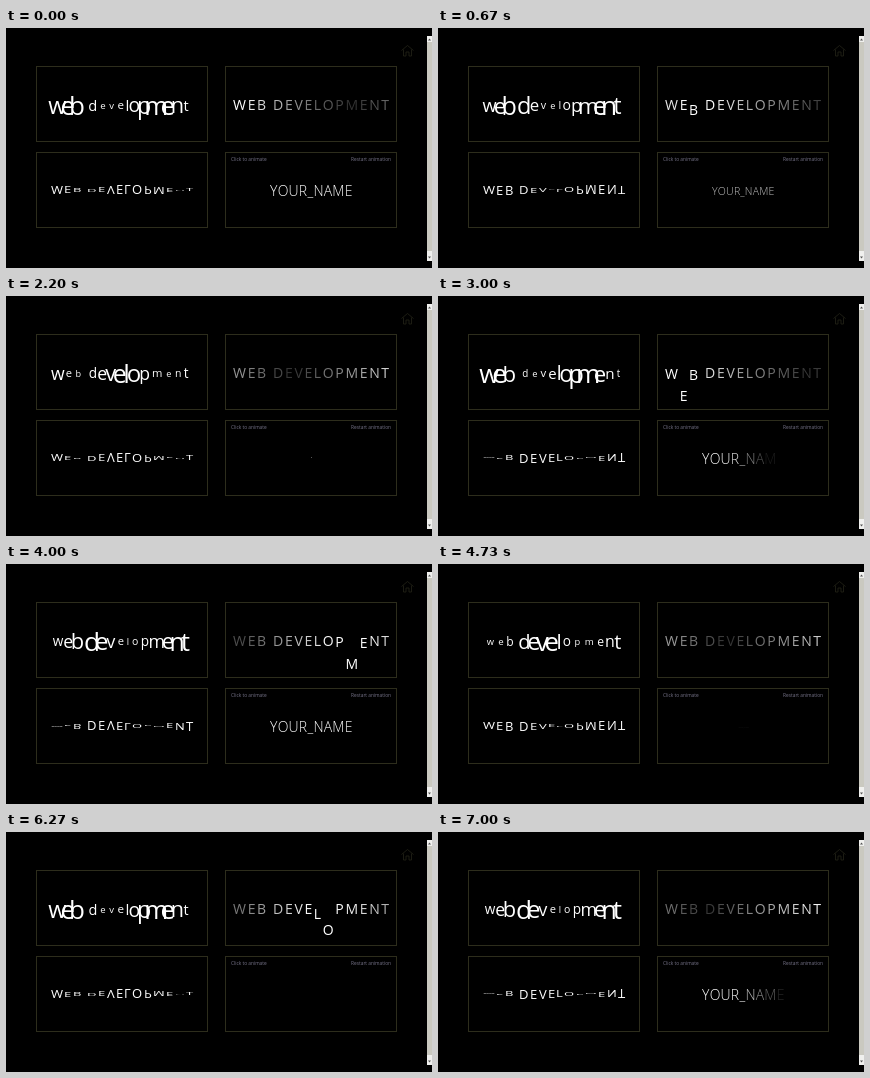
An HTML page for the animation above (7.07 s loop, 426x240 px).

```html
<!DOCTYPE html>
<html lang="en">
<head>
<meta charset="utf-8">
<title>Text animations</title>
<style>
  html, body { margin: 0; width: 100%; height: 100%; overflow: hidden; background: #000; }
  #stage { position: relative; width: 426px; height: 240px; overflow: hidden; background: #000;
    color: #fff; font-family: "Open Sans", "Noto Sans", sans-serif; }
  svg { position: absolute; left: 0; top: 0; }
  .line { position: absolute; height: 40px; line-height: 40px; white-space: pre; }
  .line span { display: inline-block; white-space: pre; }
  .label { position: absolute; top: 126px; line-height: 10px; font-size: 4.8px; color: #77748a; white-space: pre; }
</style>
</head>
<body>
<div id="stage">
  <svg width="426" height="240" viewBox="0 0 426 240">
    <g fill="none" stroke="#2d2d1c">
      <rect x="30.5" y="38.5" width="171" height="75"/>
      <rect x="219.5" y="38.5" width="171" height="75"/>
      <rect x="30.5" y="124.5" width="171" height="75"/>
      <rect x="219.5" y="124.5" width="171" height="75"/>
    </g>
    <path d="M395.5 22.500l6-5 6 5M397.500 21.500v6.500h2.500v-4h3v4h2.500v-6.500" fill="none" stroke="#242418" stroke-width=".8"/>
    <rect x="421" y="8" width="5" height="225" fill="#f0f0ee"/>
    <rect x="421" y="14" width="5" height="209" fill="#cac9c0"/>
    <path d="M422 12.500l1.500-2 1.500 2zM422 228.500l1.500 2 1.500-2z" fill="#555"/>
  </svg>
  <div class="label" style="left:225px">Click to animate</div>
  <div class="label" style="right:41px">Restart animation</div>
</div>
<script>
  const LOOP = 7070, LEAD_IN = 280;
  const TAU = 2 * Math.PI;
  const stage = document.getElementById("stage");
  const clamp = x => Math.min(1, Math.max(0, x));
  const mod = (a, n) => ((a % n) + n) % n;
  const smooth = x => (1 - Math.cos(Math.PI * x)) / 2;

  // CSS "ease": cubic-bezier(.25, .1, .25, 1)
  function ease(x) {
    const bezier = (u, a, b) => 3 * u * (1 - u) * (1 - u) * a + 3 * u * u * (1 - u) * b + u * u * u;
    let low = 0, high = 1;
    for (let k = 0; k < 16; k++) {
      const mid = (low + high) / 2;
      if (bezier(mid, .25, .25) < x) low = mid; else high = mid;
    }
    return bezier(low, .1, 1);
  }

  function makeLine(text, x, centerY, size, spacing, weight = 400) {
    const line = document.createElement("div");
    line.className = "line";
    Object.assign(line.style, {
      left: x + "px", top: centerY - 20 + "px", fontSize: size + "px",
      letterSpacing: spacing + "px", fontWeight: weight
    });
    const letters = [...text].map(char => {
      const span = document.createElement("span");
      span.textContent = char;
      line.append(span);
      return span;
    });
    stage.append(line);
    return { line, letters };
  }

  const pulse = makeLine("web development", 47, 77, 13, 1.9);
  const drop = makeLine("WEB DEVELOPMENT", 227, 76.6, 14, 1.65);
  const flip = makeLine("WEB DEVELOPMENT", 45, 161.6, 13, 1.32);
  const reveal = makeLine("YOUR_NAME", 264, 162.6, 14, .22, 300);

  const dot = document.createElement("div");
  dot.style.cssText = "position:absolute;left:305px;top:161px;width:1px;height:1px;background:#555";
  stage.append(dot);

  // Each letter grows quickly and shrinks more slowly.
  function drawPulse(t) {
    const period = 3000, rise = .37;
    pulse.letters.forEach((el, i) => {
      const phase = mod(t + 1350 - 300 * i, period) / period;
      const size = phase < rise ? smooth(phase / rise) : smooth((1 - phase) / (1 - rise));
      el.style.transform = `scale(${.7 + 1.32 * size})`;
    });
  }

  function drawDrop(t) {
    const period = 2500, half = 125;
    drop.letters.forEach((el, i) => {
      const age = mod(t - 288 - 100 * i, period);
      const fall = age < half ? ease(age / half)
        : age < 2 * half ? 1 - ease(age / half - 1) : 0;
      const distance = Math.abs(mod(age - half + period / 2, period) - period / 2);
      el.style.transform = `translateY(${23 * fall}px)`;
      el.style.opacity = 1 - .82 * clamp((distance - half) / (period / 2 - half));
    });
  }

  function drawFlip(t) {
    flip.letters.forEach((el, i) => {
      const height = Math.sin(TAU * ((i - .4) / 20 - t / 2000 + 1.5));
      el.style.transform = `scaleY(${height})`;
    });
  }

  function drawReveal(t) {
    const phase = t % 3900;
    const shrink = phase < 2400 ? ease(clamp((phase - 600) / 400)) : 0;
    reveal.line.style.transform = `scale(${1 - shrink})`;
    reveal.letters.forEach((el, i) => {
      el.style.opacity = phase < 2400 ? 1 - shrink : clamp((phase - 2400 - 80 * i) / 400);
    });
    dot.style.opacity = t > 1000 && t < 2500 ? 1 : 0;
  }

  const start = performance.now();
  function frame() {
    const t = Math.max(LEAD_IN, (performance.now() - start) % LOOP);
    drawPulse(t);
    drawDrop(t);
    drawFlip(t);
    drawReveal(t);
    requestAnimationFrame(frame);
  }
  frame();
</script>
</body>
</html>
```
